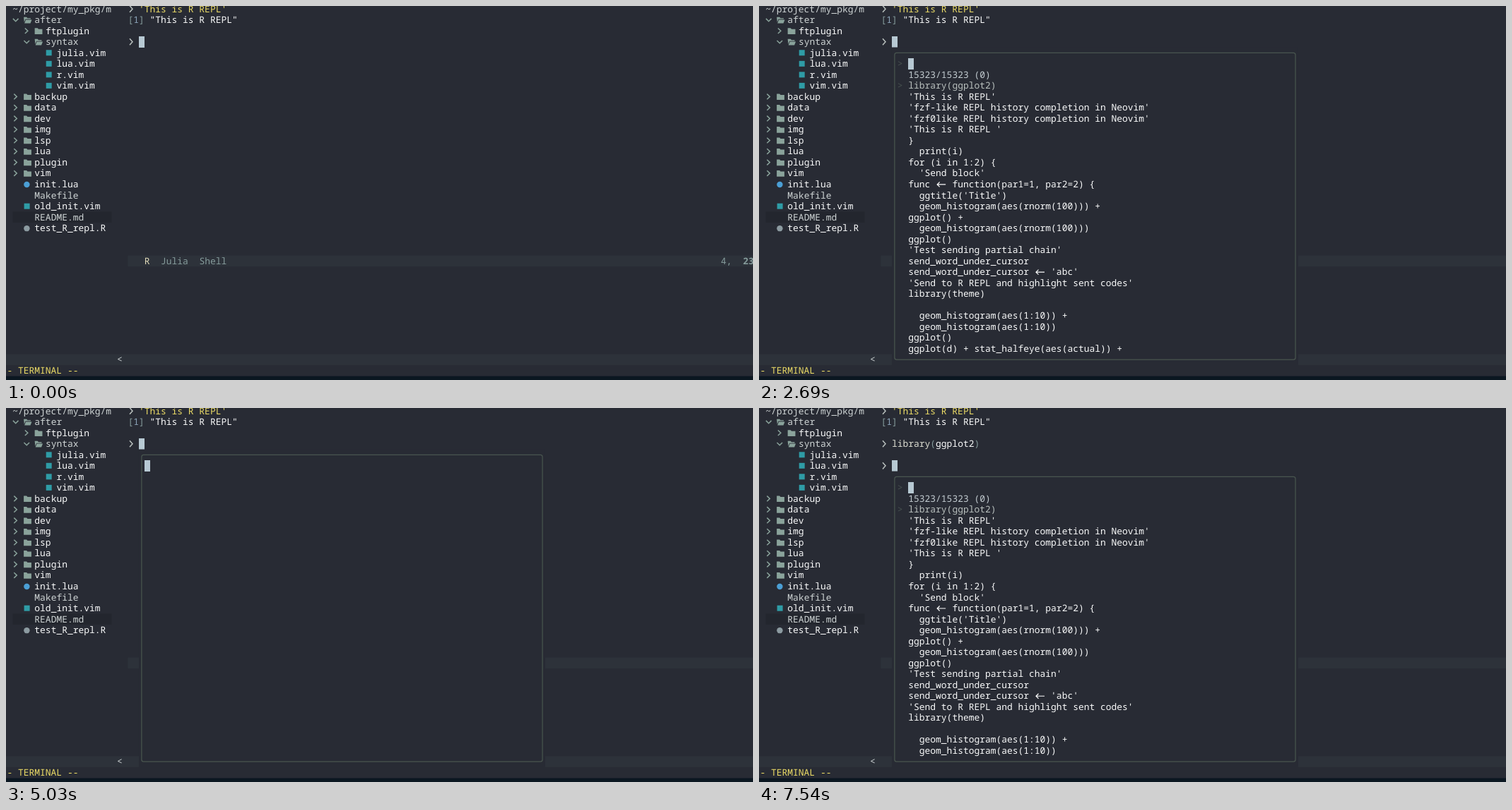
Recreate the animation shown at these times as an HTML page. Size 1057x530 px, loop 8000 ms.

```html
<!DOCTYPE html>
<html lang="en">
<head>
<meta charset="utf-8">
<title>REPL history completion</title>
<style>
  html, body { margin: 0; width: 100%; height: 100%; overflow: hidden; background: #282b34; }
  svg { display: block; }
  text {
    font: 500 12.95px "Noto Sans Mono", "DejaVu Sans Mono", monospace;
    white-space: pre;
    text-rendering: geometricPrecision;
  }
</style>
</head>
<body>
<svg width="1057" height="530" viewBox="0 0 1057 530">
  <rect width="1057" height="530" fill="#282b34"/>
  <g id="tree"></g>
  <g id="screen"></g>
  <rect y="524.5" width="1057" height="6" fill="#0b1721"/>
</svg>
<script>
const LOOP = 8000, CW = 7.77, RH = 15.53;
const C = {
  bg: '#282b34', bar: '#2d323a', row: '#23262e', white: '#fafbfb', soft: '#cfd5d5',
  dim: '#b9c0be', count: '#c3ccd1', grey: '#869c9c', faint: '#47514f', yellow: '#ebdb66',
  cursor: '#b7c9d3', border: '#49564f', folder: '#8aa39b', vim: '#2f9ca6', lua: '#4b9fd5',
  r: '#8c9ba1'
};

const colX = c => 1.5 + c * CW;
const rowY = r => r * RH - 3.6;
const midY = r => rowY(r) + RH / 2;
const esc = s => s.replace(/&/g, '&amp;').replace(/</g, '&lt;');
const span = (s, fill) => `<tspan fill="${fill}">${esc(s)}</tspan>`;
const rect = (x, y, w, h, fill) =>
  `<rect x="${x}" y="${y}" width="${w}" height="${h}" fill="${fill}"/>`;
const line = (d, stroke, w = 1.2) =>
  `<path d="${d}" fill="none" stroke="${stroke}" stroke-width="${w}"/>`;
const rich = (c, r, body, fill = C.white, extra = '') =>
  `<text x="${colX(c)}" y="${rowY(r) + 12.1}" fill="${fill}" ${extra}>${body}</text>`;
const text = (c, r, s, fill, extra) => rich(c, r, esc(s), fill, extra);
const block = (c, r) => rect(Math.round(colX(c)), Math.round(rowY(r)), 8, 16, C.cursor);
const prompt = (r, fill = C.dim) =>
  line(`M175 ${midY(r) - 4.6}l4 4.6l-4 4.6`, fill, 1.5);

// File tree: [indent, kind, name]
const TREE = [
  [0, 'open', 'after'], [1, 'dir', 'ftplugin'], [1, 'open', 'syntax'],
  [2, 'vim', 'julia.vim'], [2, 'vim', 'lua.vim'], [2, 'vim', 'r.vim'], [2, 'vim', 'vim.vim'],
  ...['backup', 'data', 'dev', 'img', 'lsp', 'lua', 'plugin', 'vim'].map(n => [0, 'dir', n]),
  [0, 'lua', 'init.lua'], [0, '', 'Makefile'], [0, 'vim', 'old_init.vim'],
  [0, '', 'README.md'], [0, 'r', 'test_R_repl.R']
];

function icon(kind, x, y) {
  if (kind === 'vim') return rect(x + 0.5, y - 4, 8, 8, C.vim);
  if (kind === 'lua' || kind === 'r')
    return `<circle cx="${x + 4.3}" cy="${y + 0.4}" r="4.2" fill="${C[kind]}"/>`;
  if (kind === 'dir')
    return `<path d="M${x} ${y - 4}h4l1.4 1.5h5.4v7.2h-10.8z" fill="${C.folder}"/>` +
      line(`M${x - 13.8} ${y - 3.8}l4 3.8l-4 3.8`, C.folder, 1.5);
  if (kind === 'open')
    return `<path d="M${x} ${y - 4}h4l1.4 1.5h4.4v1.4h-7.3l-1.8 4.4zM${x + 3} ${y - 0.2}h8.4l-2 4.9h-8.4z" fill="${C.folder}"/>` +
      line(`M${x - 15.2} ${y - 1.8}l3.8 3.8l3.8 -3.8`, C.folder, 1.5);
  return '';
}

function drawTree() {
  let out = rect(9.5, rowY(19), 140, RH, C.row) + text(1, 0, '~/project/my_pkg/m', C.soft);
  TREE.forEach(([depth, kind, name], i) => {
    const r = i + 1, c = 5 + depth * 2;
    const fill = !kind || kind === 'open' ? C.soft : C.white;
    out += icon(kind, colX(c - 2) + 0.3, midY(r)) + text(c, r, name, fill);
  });
  return out;
}

// Newest first; every query is a filter over this list
const HISTORY = `library(ggplot2)
'This is R REPL'
'fzf-like REPL history completion in Neovim'
'fzf0like REPL history completion in Neovim'
'This is R REPL '
}
  print(i)
for (i in 1:2) {
  'Send block'
func <- function(par1=1, par2=2) {
  ggtitle('Title')
  geom_histogram(aes(rnorm(100))) +
ggplot() +
  geom_histogram(aes(rnorm(100)))
ggplot()
'Test sending partial chain'
send_word_under_cursor
send_word_under_cursor <- 'abc'
'Send to R REPL and highlight sent codes'
library(theme)

  geom_histogram(aes(1:10)) +
  geom_histogram(aes(1:10))
ggplot()
ggplot(d) + stat_halfeye(aes(actual)) +
ggplot(d) + geom_histogram(aes(actual), bins = 10) +
ggplot(d) + geom_histogram(aes(actual), bins = 50) +
ggplot(d) + geom_histogram(aes(actual), bin = 50) +
ggplot(d) + geom_histogram(aes(actual)) +
ggplot(d) + stat_halfeye(aes(actual))
ggplot() + stat_halfeye(aes(d))
  js(r, "document.querySelector('#datePickerToggleBtn').click()")
#   trigger = trigger(condition = FALSE)),  # Avoid unexpected cach..
ggplot() +
..for before testing of \`VSCODE_DEBUG_SESSION\` for debugging 'dev' ..
# TODO See if this affects R debugger
ggplot(d) + geom_point(aes(cl_VIX, mdd_IXIC))
cov_prior = ggplot() + geom_line(aes(dists, ks, group = ids), alpha..
    ggplot() + geom_line(aes(x_rngs, p, col = id))  +
using DrWatson, RCall ; @quickactivate :flour_eggs_water ; @run_R_src
  ggtitle("asdasd")
ggplot(iris) +
  ggtitle('asdasd')
  ggplot(iris) +
@rlibrary ggplot2 ; @rlibrary theme
ggplot(iris)
ggplot(iris) + geom_point(aes(Sepal.Length, Sepal.Width, col = Sepa..
ggplot(iris) + geom_point(aes(Sepal.Length, Sepal.Width))
ggplot(iris) +
ggplot(iris) + fun()
ggplot(iris) + fun()
ggplot(iris) + geom_point(aes(Sepal.Length, Sepal.Width)) +`.split('\n');

const COUNTS = { '': 15323, g: 5874, gg: 412, ggp: 318, ggpl: 311, ggplo: 310, ggplot: 309 };

function entry(s, r, query, fill) {
  const arrow = s.indexOf('<-');
  const shown = s.replace('<-', '  ');
  const at = query ? shown.indexOf(query) : 0, end = at + query.length;
  let out = rich(27, r, esc(shown.slice(0, at)) + span(shown.slice(at, end), C.yellow) +
    esc(shown.slice(end)), fill);
  if (arrow >= 0) {
    const x = colX(27 + arrow) + 1.5, y = midY(r) + 0.3;
    out += line(`M${x + 12.5} ${y}h-12M${x + 4} ${y - 3.5}l-3.5 3.5l3.5 3.5`, fill);
  }
  return out;
}

// stage: 1 half painted, 2 empty box, 3 prompt only, 4 list
function drawPopup(top, stage, query) {
  const L = colX(24), W = CW * 74, x1 = L + CW / 2, x2 = L + W - CW / 2;
  const y1 = midY(top), y2 = midY(32);
  const bottom = rowY(stage === 1 ? 32 : 33);
  let out = rect(L, rowY(top), W, bottom - rowY(top), C.bg);
  out += stage === 1
    ? line(`M${x1} ${rowY(28)}V${y1 + 3}q0 -3 3 -3H${x2 - 3}q3 0 3 3V${rowY(27)}`, C.border)
    : `<rect x="${x1}" y="${y1}" width="${x2 - x1}" height="${y2 - y1}" rx="3" fill="none" stroke="${C.border}" stroke-width="1.2"/>`;
  if (stage < 3) return out + block(25, top + 1);

  out += text(25, top + 1, '>', C.faint) + text(27, top + 1, query) +
    block(27 + query.length, top + 1);
  if (stage < 4) return out;

  out += text(27, top + 2, `${COUNTS[query]}/15323 (0)`, C.count) + text(25, top + 3, '>', C.faint);
  HISTORY.filter(s => s.includes(query)).slice(0, 29 - top).forEach((s, i) => {
    out += entry(s, top + 3 + i, query, i ? C.white : C.dim);
  });
  return out;
}

// Last value whose start time has passed
const pick = (steps, t) => steps.reduce((v, [at, next]) => t >= at ? next : v, steps[0][1]);
const STAGES = [[0, 0], [2460, 1], [2540, 2], [2610, 3], [2690, 4], [5030, 2], [5200, 0],
  [7380, 1], [7460, 2], [7540, 4]];
const QUERIES = [[0, ''], [3010, 'g'], [3100, 'gg'], [3170, 'ggp'], [3250, 'ggpl'],
  [3390, 'ggplo'], [3470, 'ggplot'], [5030, '']];

function stateAt(t) {
  return {
    stage: pick(STAGES, t),
    query: pick(QUERIES, t),
    sent: t >= 5280,
    normal: t >= 5200 && t < 5660,
    mode: t < 5200 || t >= 5980,
    line: t < 5980 ? 4 : 6
  };
}

function drawScreen(s) {
  let out = rect(172.4, rowY(23), 885, RH, C.bar) + rect(0, rowY(32), 1057, RH, C.bar);
  out += text(20, 32, '<', C.soft);
  if (s.mode) out += text(-1, 33, '-- TERMINAL --', C.yellow);

  out += prompt(0) + text(24, 0, "'This is R REPL'", C.yellow);
  out += rich(22, 1, span('[', C.grey) + span('1', '#8ba3b8') + span(']', C.grey) +
    span(' "This is R REPL"', C.white));
  if (s.normal) out += block(22, 3);
  out += prompt(3, s.normal ? C.bg : C.dim);
  if (s.sent) {
    out += rich(24, 3, span('library', '#dedfd3') + span('(', C.grey) +
      span('ggplot2', C.white) + span(')', C.grey)) + prompt(5);
  }
  out += block(24, s.sent ? 5 : 3);

  if (s.stage) return out + drawPopup(s.sent ? 6 : 4, s.stage, s.query);
  return out + text(25, 23, 'R', '#e2dcba') + text(28, 23, 'Julia', C.grey) +
    text(35, 23, 'Shell', C.grey) + text(130, 23, s.line + ',', C.grey) +
    text(134, 23, '23', C.grey, 'style="font-weight:700"');
}

const screenEl = document.getElementById('screen');
let lastKey = '';

function render(t) {
  const state = stateAt(t), key = JSON.stringify(state);
  if (key === lastKey) return;
  lastKey = key;
  screenEl.innerHTML = drawScreen(state);
}

document.getElementById('tree').innerHTML = drawTree();
render(0);
let start;
function tick(now) {
  start ??= now;
  render((now - start) % LOOP);
  requestAnimationFrame(tick);
}
requestAnimationFrame(tick);
</script>
</body>
</html>
```
